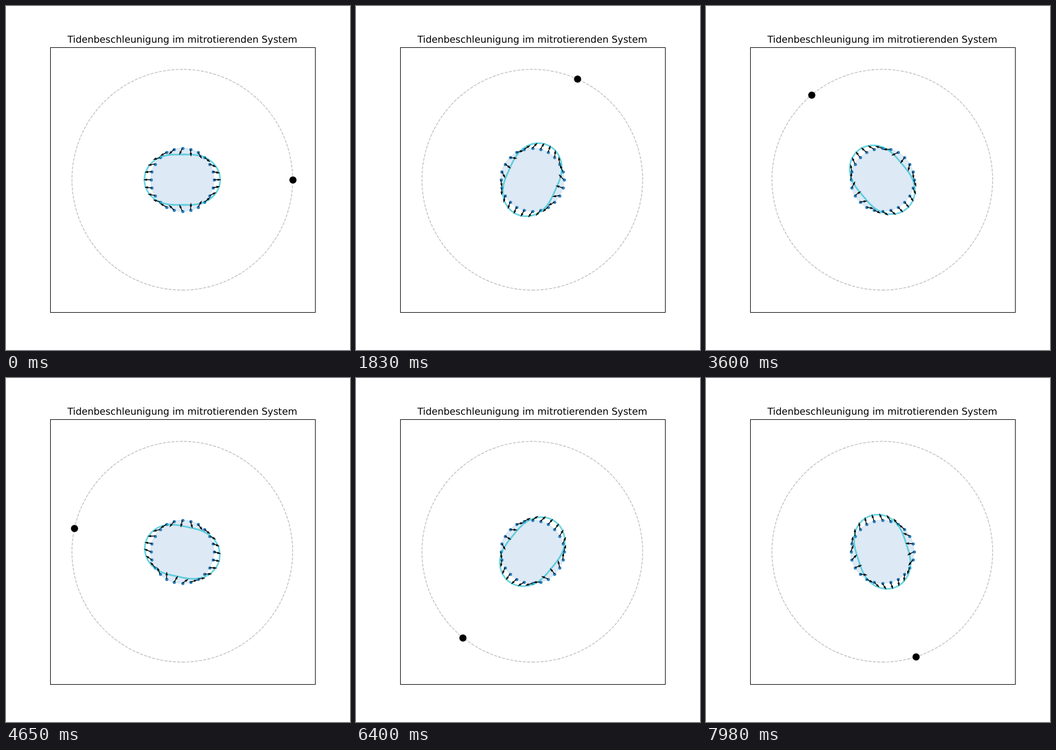
Write an HTML page that moves like this. It is 600x600 px and loops after 8000 ms.

```html
<!DOCTYPE html>
<html lang="de">
<head>
<meta charset="utf-8">
<title>Tidenbeschleunigung</title>
<style>
  html, body { margin: 0; width: 100%; height: 100%; overflow: hidden; background: #fff; }
  svg { display: block; width: 100%; height: 100%; }
  text { font: 16.667px "DejaVu Sans", sans-serif; text-rendering: geometricPrecision; }
</style>
</head>
<body>
<svg viewBox="0 0 600 600">
  <text x="307.5" y="64" text-anchor="middle">Tidenbeschleunigung im mitrotierenden System</text>
  <circle cx="307.5" cy="303" r="55" fill="#c6dbef" stroke="#c6dbef" stroke-width="1.39"
          fill-opacity=".6" stroke-opacity=".6"/>
  <path d="M307.5 495.5a192.5 192.5 0 0 0 0-385a192.5 192.5 0 0 0 0 385" fill="none"
        stroke="#808080" stroke-opacity=".5" stroke-width="1.39" stroke-dasharray="5.14 2.22"/>
  <g id="dots" fill="#3182bd"></g>
  <path id="bulge" fill="none" stroke="#17becf" stroke-opacity=".65" stroke-width="2.78" stroke-linejoin="round"/>
  <path id="arrows"/>
  <circle id="moon" r="6.25"/>
  <rect x="77.5" y="72.5" width="462" height="462" fill="none" stroke="#000"/>
</svg>
<script>
  const TAU = 2 * Math.PI, CX = 307.5, CY = 303, UNIT = 55, ORBIT = 3.5;
  const LOOP = 8000, FRAME = 25, STEP = TAU / 399;
  const DOTS = 24, ARROW = 13.2, WIDTH = 1.386;
  const $ = id => document.getElementById(id);

  const polar = (r, a) => [r * Math.cos(a), r * Math.sin(a)];
  const toStage = ([x, y]) => [CX + UNIT * x, CY - UNIT * y];
  const snap = v => Math.floor(v + 0.5) + 0.5;
  const range = (n, f) => Array.from({ length: n }, (_, i) => f(i));
  const closed = points => "M" + points.map(p => p.map(v => v.toFixed(2)).join(" ")).join("L") + "Z";

  function placeCircle(circle, point) {
    const [x, y] = toStage(point);
    circle.setAttribute("cx", snap(x));
    circle.setAttribute("cy", snap(y));
  }

  const surface = range(DOTS, i => polar(1, i * TAU / DOTS));
  for (const point of surface) {
    const dot = document.createElementNS("http://www.w3.org/2000/svg", "circle");
    dot.setAttribute("r", 2.78);
    placeCircle(dot, point);
    $("dots").append(dot);
  }

  // Outline of a unit-length-independent arrow: [along, across] in pixels
  const tip = ARROW, neck = ARROW - 4.5 * WIDTH, barb = ARROW - 5 * WIDTH;
  const half = [[0, 0.5], [neck, 0.5], [barb, 1.5]].map(([u, v]) => [u, v * WIDTH]);
  const outline = [...half, [tip, 0], ...half.map(([u, v]) => [u, -v]).reverse()];

  // Difference between the moon's pull at a point and at the centre
  function tide([px, py], [mx, my]) {
    const dx = mx - px, dy = my - py, d3 = Math.hypot(dx, dy) ** 3;
    return [dx / d3 - mx / ORBIT ** 3, dy / d3 - my / ORBIT ** 3];
  }

  function arrow(point, moon) {
    const [ax, ay] = tide(point, moon), len = Math.hypot(ax, ay);
    const c = ax / len, s = -ay / len, [x, y] = toStage(point);
    return closed(outline.map(([u, v]) => [x + u * c - v * s, y + u * s + v * c]));
  }

  function draw(time) {
    const tick = Math.floor(time % LOOP / 10) * 10;
    const angle = Math.floor(tick / FRAME) * STEP;
    const moon = polar(ORBIT, angle);
    placeCircle($("moon"), moon);
    $("arrows").setAttribute("d", surface.map(p => arrow(p, moon)).join(""));
    $("bulge").setAttribute("d", closed(range(180, i => {
      const a = i * TAU / 180;
      return toStage(polar(1 + 0.2 * Math.cos(2 * (a - angle)), a));
    })));
  }

  let start;
  function loop(now) {
    start ??= now;
    draw(now - start);
    requestAnimationFrame(loop);
  }
  draw(0);
  requestAnimationFrame(loop);
</script>
</body>
</html>
```
